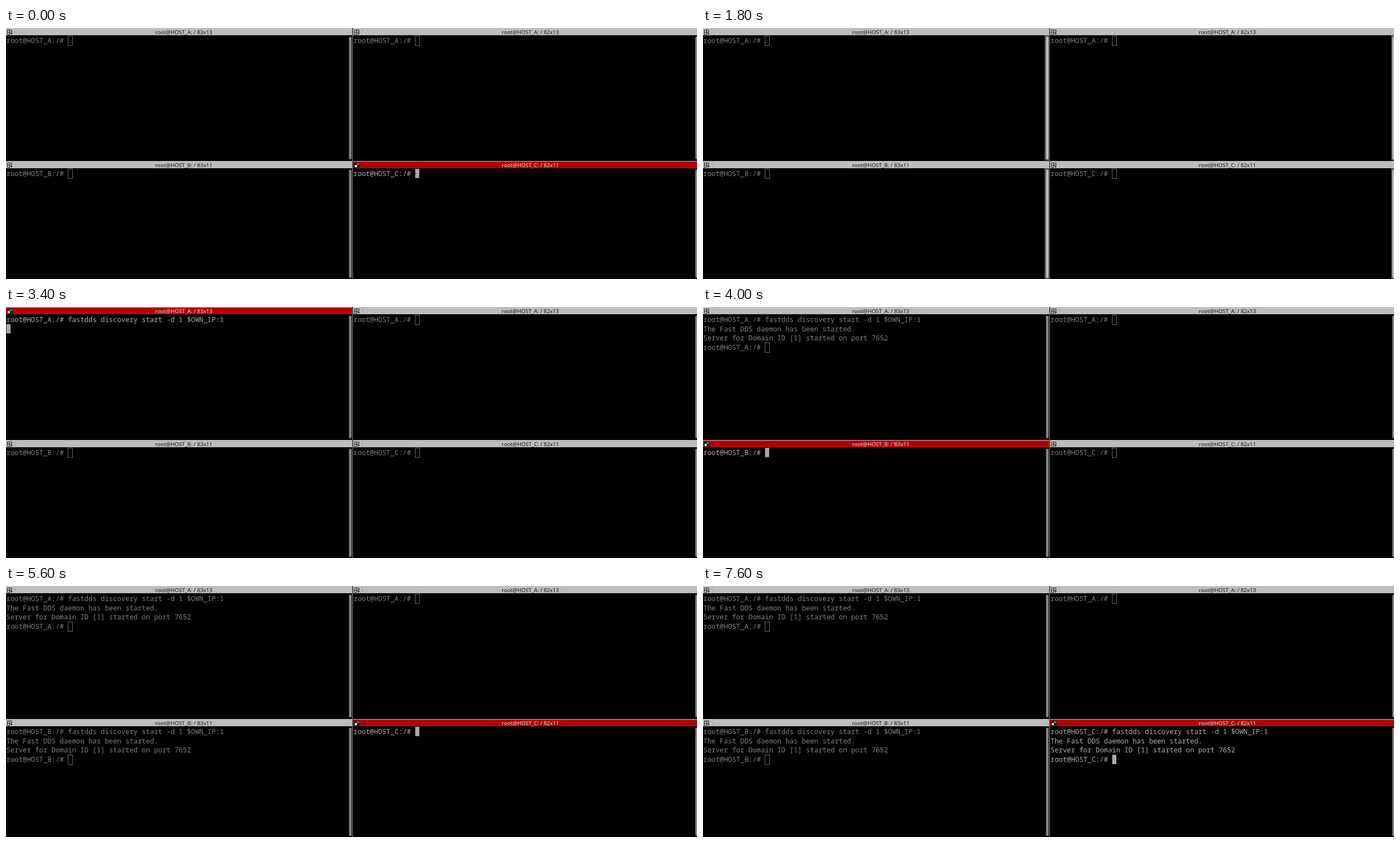
These frames come from a looping animation (1242x451 px, 8 s). An HTML page:

```html
<!DOCTYPE html>
<html lang="en">
<head>
<meta charset="utf-8">
<title>Four terminals</title>
<style>
  html, body { margin: 0; width: 100%; height: 100%; overflow: hidden; background: #000; }
  svg { display: block; }
  text { white-space: pre; }
  .term { font: 12.3px "Noto Sans Mono", monospace; }
  .title { font: 9.75px "Noto Sans", sans-serif; text-anchor: middle; }
</style>
</head>
<body>
<svg id="stage" width="1242" height="451" viewBox="0 0 1242 451"></svg>
<script>
const LOOP = 8000;
const CHAR = 7.38, LINE = 16.75;
const COMMAND = 'fastdds discovery start -d 1 $OWN_IP:1';
const OUTPUT = ['The Fast DDS daemon has been started.', 'Server for Domain ID [1] started on port 7652'];

// Times of: command shown, enter pressed, output printed
const PANES = [
  { host: 'HOST_A', size: '83x13', x: 0, y: 0, w: 622, h: 238, typed: [3200, 3400, 3600] },
  { host: 'HOST_A', size: '82x13', x: 624, y: 0, w: 618, h: 238 },
  { host: 'HOST_B', size: '83x11', x: 0, y: 239, w: 622, h: 212, typed: [4600, 4800, 5000] },
  { host: 'HOST_C', size: '82x11', x: 624, y: 239, w: 618, h: 212, typed: [6400, 6600, 6800] }
];
const FOCUS = [[0, 3], [800, -1], [2600, 0], [4000, 2], [5400, 3]];
const BARS = [[0, 'thin'], [800, 'bright'], [2600, 'dark'], [3000, 'thin']];
const CURSOR_OFF = [[400, 800], [3800, 4000], [6000, 6400], [7000, 7600]];

const stage = document.getElementById('stage');

function add(parent, tag, attrs, content) {
  const el = document.createElementNS('http://www.w3.org/2000/svg', tag);
  for (const key in attrs) el.setAttribute(key, attrs[key]);
  if (content) el.textContent = content;
  parent.appendChild(el);
  return el;
}
const rect = (parent, x, y, width, height, fill, rx = 0) =>
  add(parent, 'rect', { x, y, width, height, fill, rx });

const set = (el, attrs) => { for (const key in attrs) el.setAttribute(key, attrs[key]); };
const at = (steps, t) => steps.filter(s => s[0] <= t).pop()[1];

function buildPane(p) {
  const g = add(stage, 'g', { transform: `translate(${p.x} ${p.y})` });
  rect(g, 0, 0, p.w, 1, '#c4c4bc');
  p.bar = rect(g, 0, 1, p.w, 12, '#bdbdbb');
  p.title = add(g, 'text', { x: p.x ? 318.5 : 319.5, y: 10.6, class: 'title' }, `root@${p.host}: / ${p.size}`);
  rect(g, 16, 2, 1, 10, 'rgba(0,0,0,.1)');

  p.idle = add(g, 'g', {});
  add(p.idle, 'path', { d: 'M2.5 3.5h8v8h-8zM6.5 3.5v8M2.5 7.5h8', fill: 'none', stroke: '#222' });
  rect(p.idle, 7, 8, 5, 4, '#bdbdbb');
  add(p.idle, 'path', { d: 'M7.5 9h4.5l-2.2 3z', fill: '#222' });
  p.active = add(g, 'g', {});
  rect(p.active, 2, 3, 10, 9, '#201818');
  rect(p.active, 3, 7, 4, 4, '#e4e4e4');
  rect(p.active, 7, 4, 4, 3, '#2d8fb5');

  p.trough = rect(g, p.x ? 613 : 614, 13, 9, p.h - 13, '#555');
  p.thumb = rect(g, p.x ? 615 : 616.5, 15.5, 4.5, p.h - 17.5, '#858585', 2);
  p.cursor = rect(g, 0, 0, CHAR, 17, 'none');
  p.lines = [0, 1, 2, 3].map(i => add(g, 'text', { x: 0.6, y: 26.8 + i * LINE, class: 'term' }));
}

function screen(p, t) {
  const prompt = `root@${p.host}:/# `;
  const step = p.typed ? p.typed.filter(s => s <= t).length : 0;
  if (step === 0) return [prompt];
  if (step === 1) return [prompt + COMMAND];
  if (step === 2) return [prompt + COMMAND, ''];
  return [prompt + COMMAND, ...OUTPUT, prompt];
}

function drawPane(p, t, focused, bars) {
  set(p.bar, { fill: focused ? '#b40004' : '#bdbdbb' });
  set(p.title, { fill: focused ? '#f0dede' : '#161616' });
  set(p.idle, { visibility: focused ? 'hidden' : 'visible' });
  set(p.active, { visibility: focused ? 'visible' : 'hidden' });
  set(p.trough, { visibility: bars === 'thin' ? 'hidden' : 'visible', fill: bars === 'dark' ? '#626262' : '#555' });
  set(p.thumb, { fill: bars === 'bright' ? '#bdbdbb' : '#858585' });

  const rows = screen(p, t);
  p.lines.forEach((line, i) => {
    line.textContent = rows[i] || '';
    set(line, { fill: focused ? '#b2b2b2' : '#828282' });
  });

  const last = rows.length - 1;
  const x = 0.8 + rows[last].length * CHAR, y = 14 + last * LINE;
  const off = CURSOR_OFF.some(([from, to]) => t >= from && t < to);
  if (focused) {
    set(p.cursor, { x, y, width: CHAR, height: 16.75, fill: off ? 'none' : '#aaa', stroke: 'none' });
  } else {
    set(p.cursor, { x: Math.floor(x) + 0.5, y: Math.floor(y) + 0.5, width: 8, height: 17, fill: 'none', stroke: '#6c6c60' });
  }
}

rect(stage, 0, 0, 1242, 451, '#000');
rect(stage, 622, 0, 1.4, 451, '#777');
PANES.forEach(buildPane);

const start = performance.now();
let shown = -1;
function frame(now) {
  const t = Math.max(0, now - start) % LOOP;
  const tick = Math.floor(t / 200);
  if (tick !== shown) {
    shown = tick;
    const focus = at(FOCUS, t), bars = at(BARS, t);
    PANES.forEach((p, i) => drawPane(p, t, i === focus, bars));
  }
  requestAnimationFrame(frame);
}
frame(start);
</script>
</body>
</html>
```
